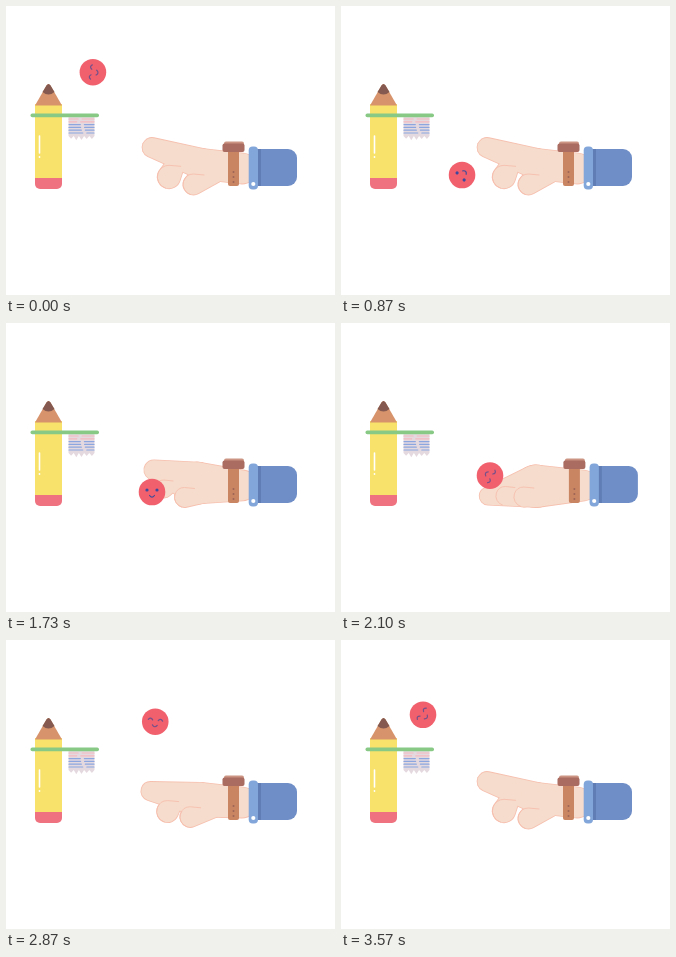
An HTML page with a canvas that plays this animation: 329 px wide and 289 px high, repeating every 3610 ms.

```html
<!DOCTYPE html>
<html lang="en">
<head>
<meta charset="utf-8">
<title>Pencil hoop</title>
<style>
html, body { margin: 0; width: 100%; height: 100%; overflow: hidden; background: #fff; }
canvas { display: block; width: 100vw; height: 100vh; }
</style>
</head>
<body>
<canvas id="stage"></canvas>
<script>
const W = 329, H = 289, LOOP = 3610;
const canvas = document.getElementById('stage');
const ctx = canvas.getContext('2d');
const ratio = window.devicePixelRatio || 1;
canvas.width = W * ratio;
canvas.height = H * ratio;
ctx.scale(ratio, ratio);

const SKIN = '#f6dccc', SKIN_LINE = '#f6bfae';
const mix = (a, b, u) => a + (b - a) * u;
const clamp = u => Math.min(1, Math.max(0, u));
const smooth = u => u * u * (3 - 2 * u);
const ramp = (t, from, to) => smooth(clamp((t - from) / (to - from)));
const noise = seed => Math.abs(Math.sin(seed * 127.1) * 43758.5) % 1;

// Contacts and apexes; lift bends the way to each one into a parabola.
const stops = [
  { t: 10, x: 88, y: 65.8, turn: -90 },
  { t: 420, x: 112, y: 169, turn: -180, lift: 26 },
  { t: 680, x: 117, y: 169, turn: -157, lift: 11 },
  { t: 870, x: 121, y: 169, turn: -135 },
  { t: 1500, x: 146, y: 169, turn: 0 },
  { t: 1780, x: 146, y: 169, turn: 0 },
  { t: 2100, x: 149, y: 153, turn: 120 },
  { t: 2610, x: 149, y: 68.5, turn: 375, lift: 21 },
  { t: 3115, x: 149.5, y: 118, turn: 360, lift: 12.4 },
  { t: 3135, x: 150, y: 103, turn: 350 },
  { t: 3530, x: 77, y: 95, turn: -20, lift: 48 },
  { t: 3620, x: 88, y: 65.8, turn: -90, lift: 7 }
];

function ballAt(t) {
  if (t < stops[0].t) t += LOOP;
  const i = stops.findIndex(stop => t <= stop.t) || 1;
  const a = stops[i - 1], b = stops[i];
  const u = (t - a.t) / (b.t - a.t);
  return {
    x: mix(a.x, b.x, u),
    y: mix(a.y, b.y, u) - 4 * (b.lift || 0) * u * (1 - u),
    turn: mix(a.turn, b.turn, u) * Math.PI / 180
  };
}

// Every part is a circle [x, y, radius]; skin is stretched between them.
const poses = {
  point: { palm: [196, 158, 15.5], index: [146, 141.5, 10], middle: [163, 171, 11.7], thumb: [187.5, 178.5, 10.5] },
  grip: { palm: [191, 160, 21], index: [148, 147, 10.2], middle: [158, 166, 9], thumb: [178.5, 174.5, 10] },
  cup: { palm: [189, 163.2, 21.3], index: [141.5, 173, 9.2], middle: [158.5, 173, 9.5], thumb: [177, 174, 10] }
};
const WRIST = [236, 162.5, 15.5], THUMB_ROOT = [206, 163, 15];

const blend = (a, b, u) => a.map((v, k) => mix(v, b[k], u));

function handAt(t) {
  const toGrip = ramp(t, 1150, 1500), toCup = ramp(t, 1780, 1980), toPoint = ramp(t, 2650, 3000);
  const hand = {};
  for (const part in poses.point) {
    const { point, grip, cup } = poses;
    const closing = blend(blend(point[part], grip[part], toGrip), cup[part], toCup);
    hand[part] = blend(closing, point[part], toPoint);
  }
  hand.index[1] += 4 * ramp(t, 2950, 3080) * (1 - ramp(t, 3080, 3120));
  return hand;
}

function hull([x0, y0, r0], [x1, y1, r1], grow) {
  const axis = Math.atan2(y1 - y0, x1 - x0);
  const slope = (r0 - r1) / Math.hypot(x1 - x0, y1 - y0);
  const spread = Math.acos(Math.max(-1, Math.min(1, slope)));
  ctx.beginPath();
  ctx.arc(x0, y0, r0 + grow, axis + spread, axis - spread + 2 * Math.PI);
  ctx.arc(x1, y1, r1 + grow, axis - spread, axis + spread);
  ctx.fill();
}

function box(x, y, w, h, color, radii = 0) {
  ctx.fillStyle = color;
  ctx.beginPath();
  ctx.roundRect(x, y, w, h, radii);
  ctx.fill();
}

function dot(x, y, r, color) {
  ctx.fillStyle = color;
  ctx.beginPath();
  ctx.arc(x, y, r, 0, Math.PI * 2);
  ctx.fill();
}

function line(x0, y0, x1, y1, color, width) {
  ctx.strokeStyle = color;
  ctx.lineWidth = width;
  ctx.beginPath();
  ctx.moveTo(x0, y0);
  ctx.lineTo(x1, y1);
  ctx.stroke();
}

// A triangle with a rounded top and a bulging base.
function cone(x, top, half, base, bulge, color) {
  ctx.fillStyle = color;
  ctx.beginPath();
  ctx.moveTo(x - half, base);
  ctx.lineTo(x - 2, top + 2);
  ctx.quadraticCurveTo(x, top - 1, x + 2, top + 2);
  ctx.lineTo(x + half, base);
  ctx.quadraticCurveTo(x, base + bulge, x - half, base);
  ctx.fill();
}

function drawPencil() {
  box(29, 98, 27, 76, '#f8e26b');
  box(29, 172, 27, 11, '#ee727f', [0, 0, 5, 5]);
  cone(42.5, 77.5, 13.5, 99.5, 0, '#d7946c');
  cone(42.5, 77.5, 6, 86, 5, '#85594f');
  line(33.5, 130, 33.5, 147, '#fff', 1.6);
  dot(33.5, 151, 0.9, '#fff');
}

function drawNet() {
  ctx.fillStyle = '#e5d9e0';
  ctx.beginPath();
  ctx.moveTo(88.5, 110);
  for (let i = 0; i <= 10; i++) {
    const hang = i % 2 ? 2 + 4 * noise(i) : 0;
    ctx.lineTo(88.5 - 2.6 * i, 130 + hang);
  }
  ctx.lineTo(62.5, 110);
  ctx.fill();
  for (let i = 0; i < 6; i++) {
    const y = 113 + 2.8 * i, gap = 70 + 9 * noise(i + 3);
    const color = i < 2 ? '#f3b9bd' : '#8ca7e0';
    line(63, y, gap, y, color, 1.2);
    line(gap + 4, y, 88, y, color, 1.2);
  }
  box(24.5, 107.5, 68.5, 3.7, '#87c985', 1.8);
}

function knuckle([x, y, r]) {
  ctx.beginPath();
  ctx.arc(x, y, r, 0.6 * Math.PI, 1.5 * Math.PI);
  ctx.lineTo(x + r, y - r + 1);
  ctx.stroke();
}

function drawHand(t) {
  const { palm, index, middle, thumb } = handAt(t);
  const middleRoot = [...blend(index, palm, 0.55).slice(0, 2), 8];
  const links = [[palm, WRIST], [index, palm], [middle, middleRoot], [thumb, THUMB_ROOT]];
  // The larger pass below leaves one outline around all parts.
  for (const [color, grow] of [[SKIN_LINE, 0.4], [SKIN, -0.45]]) {
    ctx.fillStyle = color;
    links.forEach(([from, to]) => hull(from, to, grow));
  }
  ctx.strokeStyle = SKIN_LINE;
  ctx.lineWidth = 0.9;
  knuckle(middle);
  knuckle(thumb);
}

function drawSleeve() {
  box(222, 143, 11, 37, '#c98461', 2);
  for (let i = 0; i < 3; i++) dot(227.5, 166 + 5 * i, 1, '#9d6557');
  box(218, 135.5, 20, 5, '#cc9583', 2);
  box(216.5, 137.5, 22, 8.5, '#aa6b60', 2);
  box(250, 143, 41, 37, '#6f8ec7', [0, 9, 9, 0]);
  box(250, 143, 5, 37, '#607eb5');
  box(242.7, 140.5, 9.3, 43, '#82a6d9', 4);
  dot(247.3, 178, 2.1, '#fff');
}

function arch(x, y, half, height) {
  ctx.beginPath();
  ctx.moveTo(x - half, y);
  ctx.quadraticCurveTo(x, y - 2 * height, x + half, y);
  ctx.stroke();
}

function drawBall(t) {
  const { x, y, turn } = ballAt(t);
  const flicked = t > 3115 && t < 3180;
  const happy = t < 450 || t > 1850;
  if (flicked) line(x - 0.7, y + 15.5, x - 0.7, y + 18, '#f4d6a9', 1.2);
  ctx.save();
  ctx.translate(x, y);
  if (flicked) {
    ctx.rotate(Math.PI / 4);
    ctx.scale(1.06, 0.98);
    ctx.rotate(-Math.PI / 4);
  }
  dot(0, 0, 13.3, '#f0616d');
  ctx.rotate(turn);
  ctx.strokeStyle = happy ? '#75508a' : '#404c9a';
  ctx.lineWidth = 1.2;
  for (const side of [-5, 5]) {
    if (happy) arch(side, -1.5, 2.2, 1.5);
    else dot(side, -2, 1.6, '#3e489d');
  }
  arch(0, 3.5, 2.4, -1.6);
  ctx.restore();
}

function draw() {
  const t = performance.now() % LOOP;
  const swing = clamp((t - 1780) / 405);
  ctx.fillStyle = '#fff';
  ctx.fillRect(0, 0, W, H);
  ctx.lineCap = ctx.lineJoin = 'round';
  drawPencil();
  drawNet();
  ctx.save();
  ctx.translate(16 * Math.sin(Math.PI * swing) ** 2, 0);
  drawHand(t);
  drawSleeve();
  ctx.restore();
  drawBall(t);
  requestAnimationFrame(draw);
}
draw();
</script>
</body>
</html>
```
